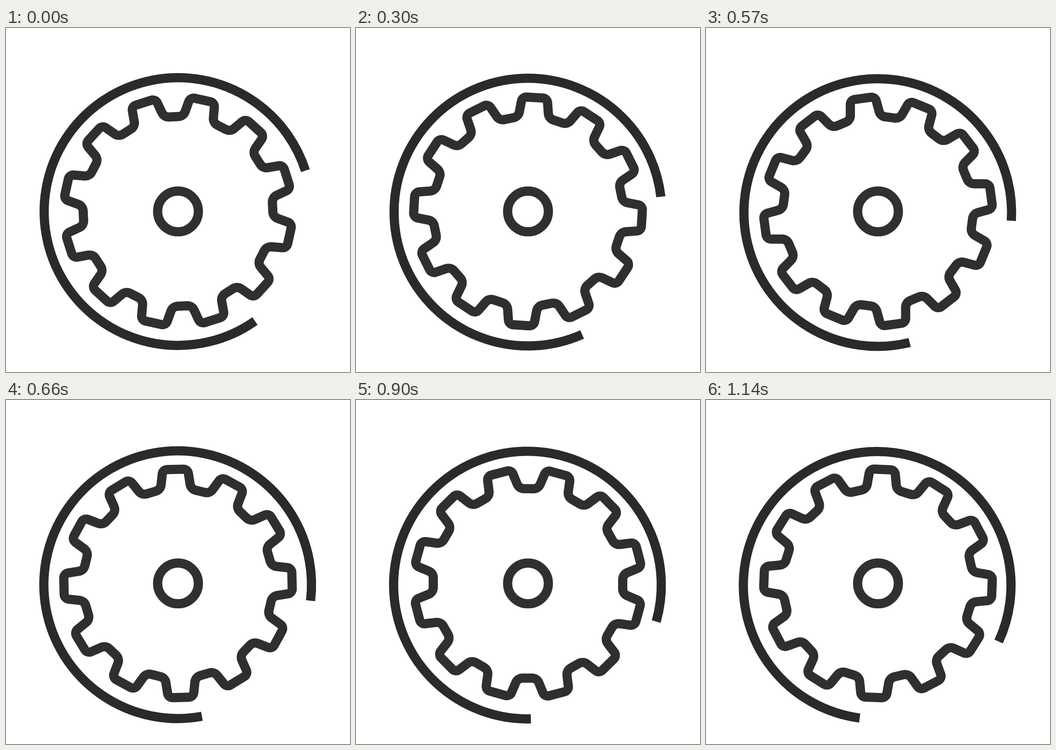
An HTML page with a canvas for the animation above (1.17 s loop, 748x748 px).

```html
<!DOCTYPE html>
<html lang="en">
<head>
<meta charset="utf-8">
<title>Turning gear</title>
<style>
  html, body { margin: 0; width: 100%; height: 100%; overflow: hidden; background: #fff; }
  canvas { display: block; width: 100vw; height: 100vh; }
</style>
</head>
<body>
<canvas id="stage" width="748" height="748"></canvas>
<script>
const ctx = document.getElementById('stage').getContext('2d');
const LOOP = 1170, STEP = 30, TEETH = 12;
const rad = degrees => degrees * Math.PI / 180;

// One tooth pointing up: x, y and rounding of each corner
const TOOTH = [[-33, -204.4, 16], [-27.2, -248, 11], [27.2, -248, 11], [33, -204.4, 16]];

function rotate([x, y, r], a) {
  const c = Math.cos(a), s = Math.sin(a);
  return [x * c - y * s, x * s + y * c, r];
}

const corners = Array.from({ length: TEETH }, (_, i) =>
  TOOTH.map(p => rotate(p, i * 2 * Math.PI / TEETH))).flat();

const gear = new Path2D();
const last = corners[corners.length - 1];
gear.moveTo((corners[0][0] + last[0]) / 2, (corners[0][1] + last[1]) / 2);
corners.forEach(([x, y, r], i) => {
  const [nextX, nextY] = corners[(i + 1) % corners.length];
  gear.arcTo(x, y, nextX, nextY, r);
});
gear.closePath();

const hub = new Path2D();
hub.arc(0, 0, 44.3, 0, 2 * Math.PI);

// Open ring, its centre slightly off its pivot
const ring = new Path2D();
ring.arc(6, 0, 291, rad(54.9 - 3), rad(360 - 17.8 - 3));

function stroke(path, x, y, degrees, color) {
  ctx.save();
  ctx.translate(x, y);
  ctx.rotate(rad(degrees));
  ctx.strokeStyle = color;
  ctx.stroke(path);
  ctx.restore();
}

function draw(now) {
  const t = Math.floor(now % LOOP / STEP) * STEP;
  ctx.fillStyle = '#fff';
  ctx.fillRect(0, 0, 748, 748);
  ctx.lineWidth = 20;
  stroke(ring, 368, 398.8, 3 + t * 0.03737, '#2a2a2a');
  stroke(gear, 374, 398.8, 12.4 + t * 0.07, '#2f2f2f');
  stroke(hub, 374, 398.8, 0, '#303030');
  requestAnimationFrame(() => draw(performance.now()));
}
draw(0);
</script>
</body>
</html>
```
